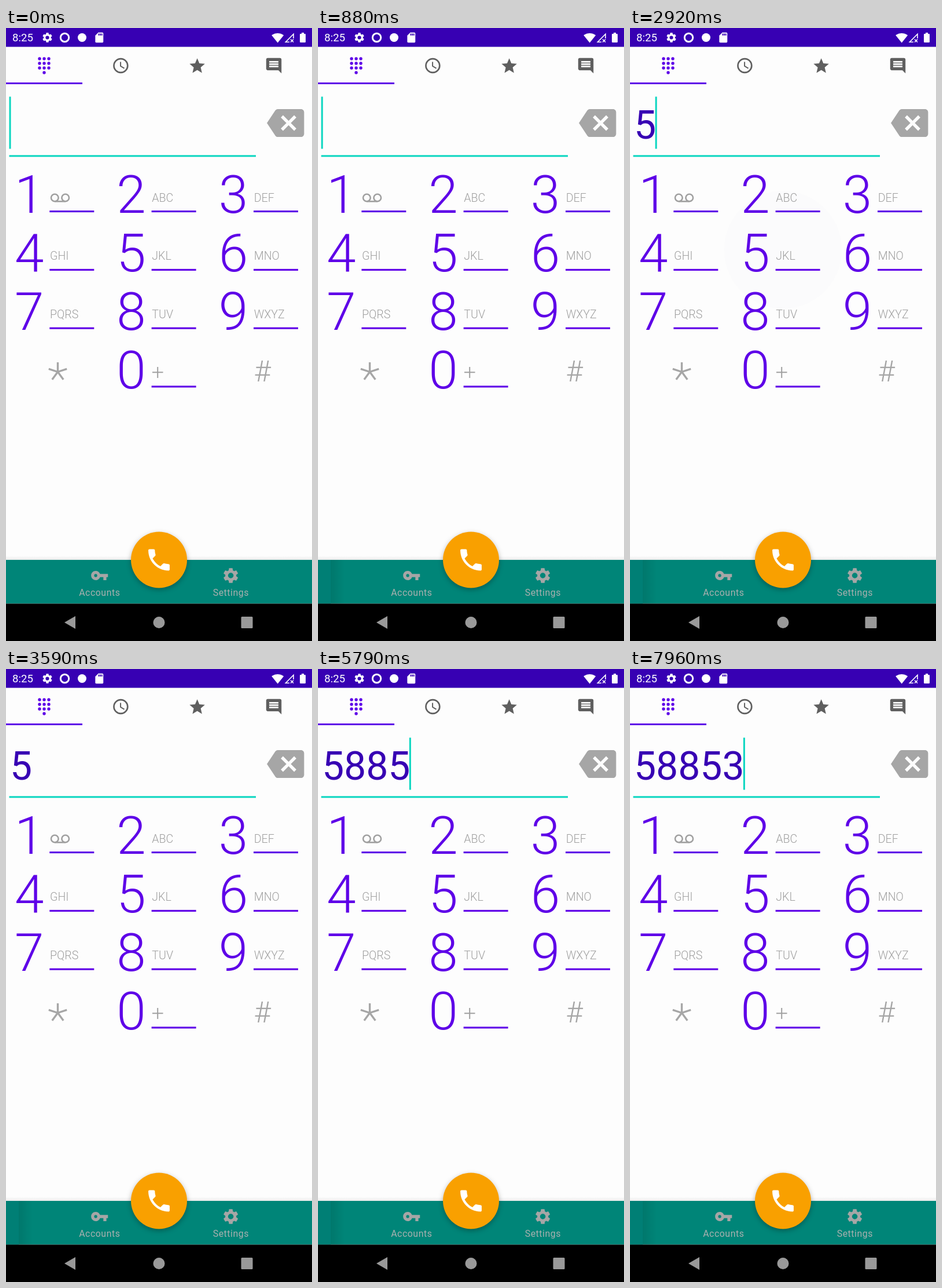
These frames come from a looping animation (529 px wide and 1058 px high, 8000 ms). An HTML page:

```html
<!DOCTYPE html>
<html lang="en">
<head>
<meta charset="utf-8">
<title>Phone dialer</title>
<style>
  html, body { margin: 0; width: 100%; height: 100%; overflow: hidden; background: #fdfdfd; }
  svg { display: block; width: 529px; height: 1058px; font-family: Roboto, sans-serif; }
  .digit { font-size: 91px; font-weight: 300; fill: #5e00e8; }
  .letters { font-size: 19.6px; font-weight: 300; fill: #a0a0a0; }
  .nav { font-size: 15.9px; letter-spacing: .52px; fill: #a9b0af; text-anchor: middle; }
  #entry { font-size: 67.8px; fill: #3700b3; }
  #fab { filter: drop-shadow(0 3px 4px rgba(0, 0, 0, .3)); }
</style>
</head>
<body>
<svg id="stage" viewBox="0 0 529 1058"></svg>
<script>
const LOOP = 8000;
const PURPLE = '#5e00e8', TEAL = '#0ad6c0', GREY = '#a6a6a6', DARK = '#5f5f5f';
const COLUMNS = [15, 191.3, 367.7], PITCH = 100.8;

// Icons on a 24-unit grid
const ICONS = {
  clock: 'M12 2a10 10 0 1 0 0 20a10 10 0 1 0 0-20zm0 18a8 8 0 1 1 0-16a8 8 0 1 1 0 16zm.5-13H11v6l5.25 3.15.75-1.23-4.5-2.67z',
  star: 'M12 17.27L18.18 21l-1.64-7.03L22 9.24l-7.19-.61L12 2 9.19 8.63 2 9.24l5.46 4.73L5.82 21z',
  comment: 'M21.99 4c0-1.1-.89-2-1.99-2H4c-1.1 0-2 .9-2 2v12c0 1.1.9 2 2 2h14l4 4zM18 14H6v-2h12zm0-3H6V9h12zm0-3H6V6h12z',
  erase: 'M22 3H7c-.69 0-1.23.35-1.59.88L0 12l5.41 8.11c.36.53.9.89 1.59.89h15c1.1 0 2-.9 2-2V5c0-1.1-.9-2-2-2zm-3 12.59L17.59 17 14 13.41 10.41 17 9 15.59 12.59 12 9 8.41 10.41 7 14 10.59 17.59 7 19 8.41 15.41 12z',
  key: 'M12.65 10C11.83 7.67 9.61 6 7 6c-3.31 0-6 2.69-6 6s2.69 6 6 6c2.61 0 4.83-1.67 5.65-4H17v4h4v-4h2v-4zM7 14a2 2 0 1 1 0-4a2 2 0 1 1 0 4z',
  gear: 'M19.14 12.94c.04-.3.06-.61.06-.94 0-.32-.02-.64-.07-.94l2.03-1.58c.18-.14.23-.41.12-.61l-1.92-3.32c-.12-.22-.37-.29-.59-.22l-2.39.96c-.5-.38-1.03-.7-1.62-.94l-.36-2.54c-.04-.24-.24-.41-.48-.41h-3.84c-.24 0-.43.17-.47.41l-.36 2.54c-.59.24-1.13.57-1.62.94l-2.39-.96c-.22-.08-.47 0-.59.22L2.74 8.87c-.12.21-.08.47.12.61l2.03 1.58c-.05.3-.09.63-.09.94s.02.64.07.94l-2.03 1.58c-.18.14-.23.41-.12.61l1.92 3.32c.12.22.37.29.59.22l2.39-.96c.5.38 1.03.7 1.62.94l.36 2.54c.05.24.24.41.48.41h3.84c.24 0 .44-.17.47-.41l.36-2.54c.59-.24 1.13-.56 1.62-.94l2.39.96c.22.08.47 0 .59-.22l1.92-3.32c.12-.22.07-.47-.12-.61zM12 15.6a3.6 3.6 0 1 1 0-7.2a3.6 3.6 0 1 1 0 7.2z',
  call: 'M6.62 10.79c1.44 2.83 3.76 5.14 6.59 6.59l2.2-2.2c.27-.27.67-.36 1.02-.24 1.12.37 2.33.57 3.57.57.55 0 1 .45 1 1V20c0 .55-.45 1-1 1-9.39 0-17-7.61-17-17 0-.55.45-1 1-1h3.5c.55 0 1 .45 1 1 0 1.25.2 2.45.57 3.57.11.35.03.74-.25 1.02z',
  card: 'M18 2h-8L4 8v12c0 1.1.9 2 2 2h12c1.1 0 2-.9 2-2V4c0-1.1-.9-2-2-2zm-6 6h-2V4h2zm3 0h-2V4h2zm3 0h-2V4h2z',
  wifi: 'M12 21.5L23.64 7c-.45-.34-4.93-4-11.64-4C5.28 3 .81 6.66.36 7z'
};

const icon = (name, x, y, scale, fill) =>
  `<path d="${ICONS[name]}" fill="${fill}" fill-rule="evenodd" transform="translate(${x} ${y}) scale(${scale}) translate(-12 -12)"/>`;
const rect = (x, y, w, h, fill, extra = '') =>
  `<rect x="${x}" y="${y}" width="${w}" height="${h}" fill="${fill}" ${extra}/>`;
const circle = (x, y, r, fill, extra = '') =>
  `<circle cx="${x}" cy="${y}" r="${r}" fill="${fill}" ${extra}/>`;
const line = (d, stroke, width) =>
  `<path d="${d}" fill="none" stroke="${stroke}" stroke-width="${width}"/>`;
const text = (x, y, value, attrs) => `<text x="${x}" y="${y}" ${attrs}>${value}</text>`;

function statusBar() {
  return rect(0, 0, 529, 32.5, '#3700b3') +
    text(11, 23, '8:25', 'font-size="18.6" fill="#fff"') +
    icon('gear', 71.5, 16.5, .86, '#fff') +
    circle(101.5, 16.5, 7.2, 'none', 'stroke="#fff" stroke-width="3"') +
    circle(131.5, 16.5, 7.5, '#fff') +
    icon('card', 161.3, 16.5, .87, '#fff') +
    icon('wifi', 469.7, 17, .9, '#fff') +
    line('M497 18V10.5L483.5 24.2H490M492 19.5l5 5m0-5l-5 5', '#fff', 1.6) +
    rect(508, 10, 10, 15, '#fff', 'rx="1.3"') + rect(511, 8, 4, 3, '#fff');
}

function tabs() {
  let dots = circle(66, 77, 2.7, PURPLE);
  for (let i = 0; i < 9; i++) dots += circle(58 + i % 3 * 8, 53 + Math.floor(i / 3) * 8, 2.7, PURPLE);
  return dots + icon('clock', 198.4, 65, 1.323, DARK) + icon('star', 330.6, 65.5, 1.323, DARK) +
    icon('comment', 463, 65, 1.323, DARK) + rect(0, 94, 132, 3, PURPLE);
}

function keypad() {
  const letters = ['', 'ABC', 'DEF', 'GHI', 'JKL', 'MNO', 'PQRS', 'TUV', 'WXYZ'];
  const key = (digit, column, row, label) => {
    const x = COLUMNS[column], y = row * PITCH;
    return text(x, 319.3 + y, digit, 'class="digit"') +
      text(x + 61, 299.5 + y, label, 'class="letters"') +
      rect(x + 60.3, 315 + y, 77, 3.1, PURPLE);
  };
  let out = letters.map((label, i) => key(i + 1, i % 3, Math.floor(i / 3), label)).join('') + key(0, 1, 3, '');
  const ring = 'stroke="#a0a0a0" stroke-width="2.6"';
  out += circle(84.3, 293, 6.3, 'none', ring) + circle(102.7, 293, 6.3, 'none', ring) +
    line('M84.3 299.3H102.7', '#a0a0a0', 2.6) + line('M253 594.3H271.5M262.2 585V604', '#a0a0a0', 2);
  for (let i = 0; i < 5; i++) {
    const angle = -Math.PI / 2 + i * Math.PI * .4;
    out += line(`M89.5 593.5l${16.5 * Math.cos(angle)} ${16.5 * Math.sin(angle)}`, GREY, 3.4);
  }
  return out + text(428.5, 610, '#', `font-size="50.5" font-weight="300" fill="${GREY}"`);
}

function bottomBar() {
  return rect(0, 911, 529, 7, 'url(#above)') + rect(0, 918, 529, 75.5, '#008578') +
    `<g id="edge">${rect(0, 918, 22, 75.5, '#007f75')}${rect(22, 918, 24, 75.5, 'url(#side)')}</g>` +
    icon('key', 161.7, 945, 1.323, GREY) + text(161.8, 980, 'Accounts', 'class="nav"') +
    icon('gear', 388.6, 945, 1.323, GREY) + text(388.8, 980, 'Settings', 'class="nav"') +
    circle(264.5, 918, 48.5, '#f9a000', 'id="fab"') + icon('call', 264.5, 918, 2.05, '#fff') +
    rect(0, 993.5, 529, 65, '#000') +
    '<path d="M101 1026L120 1015V1037z" fill="#999"/>' +
    circle(264.5, 1026, 10, '#999') + rect(406.5, 1016, 20, 20, '#999', 'rx="1.5"');
}

const gradient = (id, direction, from, to) =>
  `<linearGradient id="${id}" x1="0" y1="0" ${direction}><stop stop-color="#000" stop-opacity="${from}"/><stop offset="1" stop-color="#000" stop-opacity="${to}"/></linearGradient>`;

document.getElementById('stage').innerHTML =
  '<defs>' + gradient('above', 'x2="0" y2="1"', 0, .07) + gradient('side', 'x2="1" y2="0"', .1, 0) + '</defs>' +
  rect(0, 0, 529, 1058, '#fdfdfd') +
  circle(0, 0, 102, '#3010a0', 'id="ripple"') +
  statusBar() + tabs() +
  text(7, 190.5, '', 'id="entry"') +
  rect(0, 118.5, 3, 90, TEAL, 'id="cursor"') + rect(5.5, 219.4, 426.5, 3, TEAL) +
  icon('erase', 483.2, 164, 2.68, GREY) +
  keypad() + bottomBar();

const [ripple, entry, cursor, edge] =
  ['ripple', 'entry', 'cursor', 'edge'].map(id => document.getElementById(id));

const presses = [[2630, 5], [4210, 8], [4500, 8], [5340, 5], [6710, 3]];
const BLINK_START = -250;
const clamp = v => Math.max(0, Math.min(1, v));

function draw(t) {
  const typed = presses.filter(([time]) => time <= t);
  const [since, digit] = typed[typed.length - 1] || [BLINK_START, 0];
  const age = t - since;

  entry.textContent = typed.map(press => press[1]).join('');
  cursor.setAttribute('x', 5.5 + 38.07 * typed.length);
  cursor.setAttribute('opacity', age % 1000 < 500 ? 1 : 0);
  edge.setAttribute('opacity', t < 90 ? 0 : 1);

  // The touch ripple spreads quickly, then fades
  ripple.setAttribute('opacity', digit ? .04 * clamp((340 - age) / 220) : 0);
  if (digit) {
    ripple.setAttribute('cx', 88 + (digit - 1) % 3 * 176.4);
    ripple.setAttribute('cy', 282 + Math.floor((digit - 1) / 3) * PITCH);
    ripple.setAttribute('r', 102 * (.7 + .3 * clamp(age / 80)));
  }
}

function tick() {
  draw(performance.now() % LOOP);
  requestAnimationFrame(tick);
}
tick();
</script>
</body>
</html>
```
